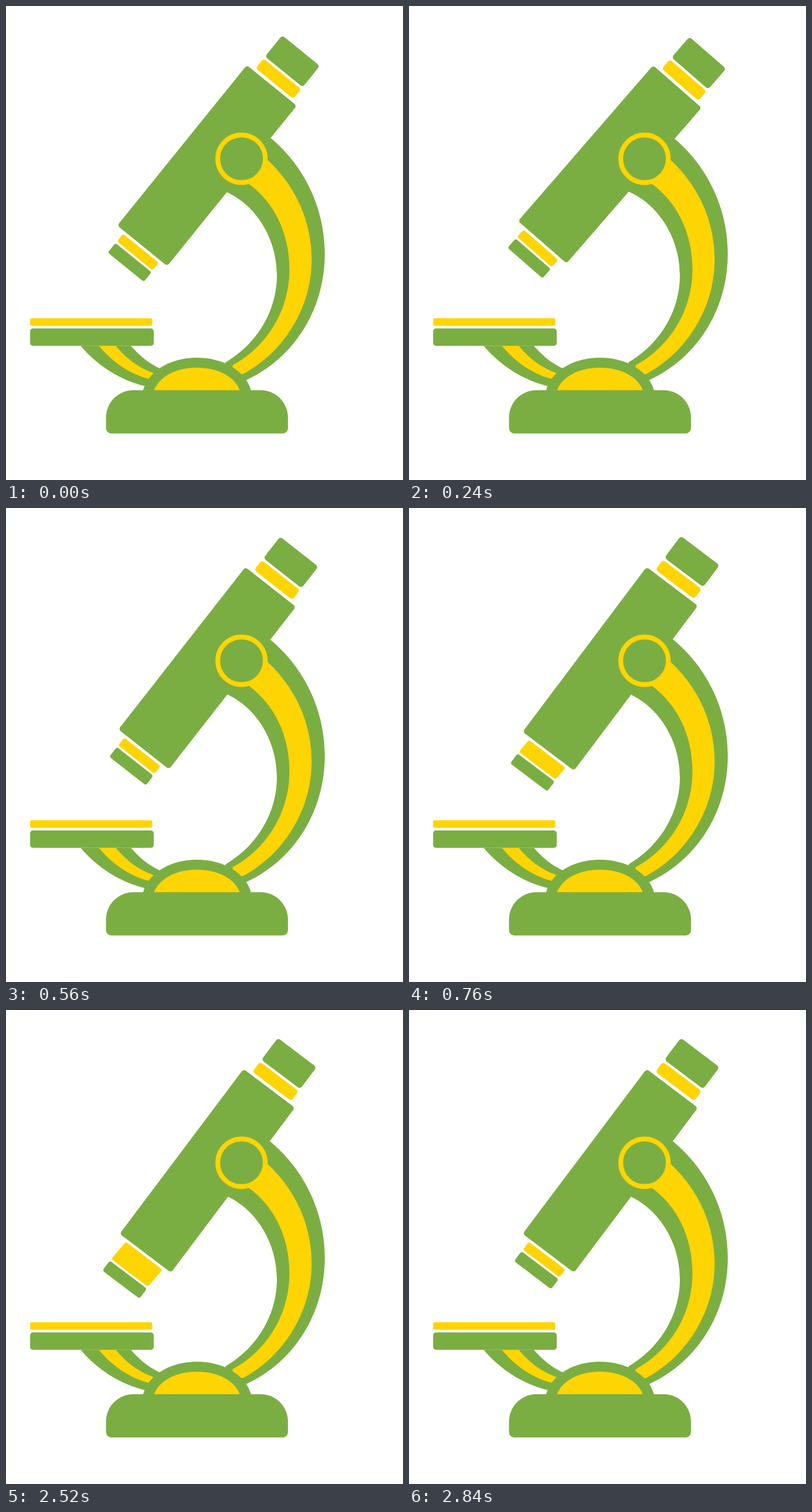
An HTML page for the animation above (3520 ms loop, 680 by 810 pixels).

```html
<!DOCTYPE html>
<html lang="en">
<head>
<meta charset="utf-8">
<title>Microscope</title>
<style>
  html, body { margin: 0; height: 100%; overflow: hidden; background: #fff; }
  svg { display: block; width: 680px; height: 810px; }
  .g { fill: #7bae42; }
  .y { fill: #ffd403; }
  #ring { stroke: #ffd403; stroke-width: 8; stroke-linejoin: round; }
</style>
</head>
<body>
<svg viewBox="0 0 680 810">
  <!-- curved arm -->
  <path class="g" d="M440 215L454 226C511 274 546 345 546 424C546 520 492 602 412 639L376 640V609C429 578 464 522 464 460C464 398 429 341 378 318L365 313Z"/>
  <path class="y" d="M420 262H447C494 305 523.5 365 523.5 434C523.5 515 476 592 406 629L388 630V614C447 582 485.5 520 485.5 450C485.5 389 460 336 416 304Z"/>

  <!-- stage and its support -->
  <path class="g" d="M128 580.7C156 614 196 640 240 650H263V619C245 611 228 597 214 580.7Z"/>
  <path class="y" d="M159 580.7C181 607 210 628 244 637H252V627C226 618 205 601 188 580.7Z"/>
  <rect class="g" x="41.3" y="551" width="211.7" height="29.7" rx="5"/>
  <rect class="y" x="41.3" y="533.5" width="209.2" height="13" rx="3"/>

  <!-- dome and base -->
  <path class="g" d="M234.5 658C243 624 281 601 327 601C373 601 411 624 420 658Z"/>
  <path class="y" d="M253.5 657C262 633 292 618 327 618C362 618 392 633 400.5 657Z"/>
  <path class="g" d="M218 656.5H436A47 47 0 0 1 483 703.5V721.5A9 9 0 0 1 474 730.5H180.3A9 9 0 0 1 171.3 721.5V703.5A47 47 0 0 1 218 656.5Z"/>

  <!-- tube, drawn upright around the pivot -->
  <g id="tube">
    <rect class="g" x="-78.6" y="-207.7" width="83" height="46.7" rx="5"/>
    <rect class="y" x="-78.6" y="-156.7" width="83" height="21.3" rx="5"/>
    <rect class="g" x="-93.6" y="-130" width="110.1" height="352.6" rx="5"/>
    <path class="y" id="ring"/>
    <rect class="g" id="lens" x="-77.2" y="247.7" width="79.5" height="21.1" rx="4"/>
  </g>
  <circle class="g" cx="403.4" cy="261" r="40.7" stroke="#ffd403" stroke-width="8.2"/>
</svg>
<script>
  const LOOP = 3520, STEP = 40, TILT = 39;
  const el = id => document.getElementById(id);
  const tube = el('tube'), ring = el('ring'), lens = el('lens');
  const ramp = (t, from, to) => Math.min(1, Math.max(0, (t - from) / (to - from)));

  function draw(t) {
    const swing = 10 / 3 * ramp(t, 0, 400) - 16 / 3 * ramp(t, 400, 600);
    const out = ramp(t, 600, 1000) - ramp(t, 2480, 2840);
    const dx = -2.5 * out, dy = 24.5 * out;
    tube.setAttribute('transform', `translate(403.4 261) rotate(${TILT + swing})`);
    lens.setAttribute('transform', `translate(${dx} ${dy})`);
    // only the far edge of the ring follows the lens
    ring.setAttribute('d', `M-73 231.3H-2.3L${dx - 2.3} ${dy + 240}H${dx - 73}Z`);
  }

  const start = performance.now();
  function tick() {
    const t = (performance.now() - start) % LOOP;
    draw(Math.floor(t / STEP) * STEP);
    requestAnimationFrame(tick);
  }
  tick();
</script>
</body>
</html>
```
